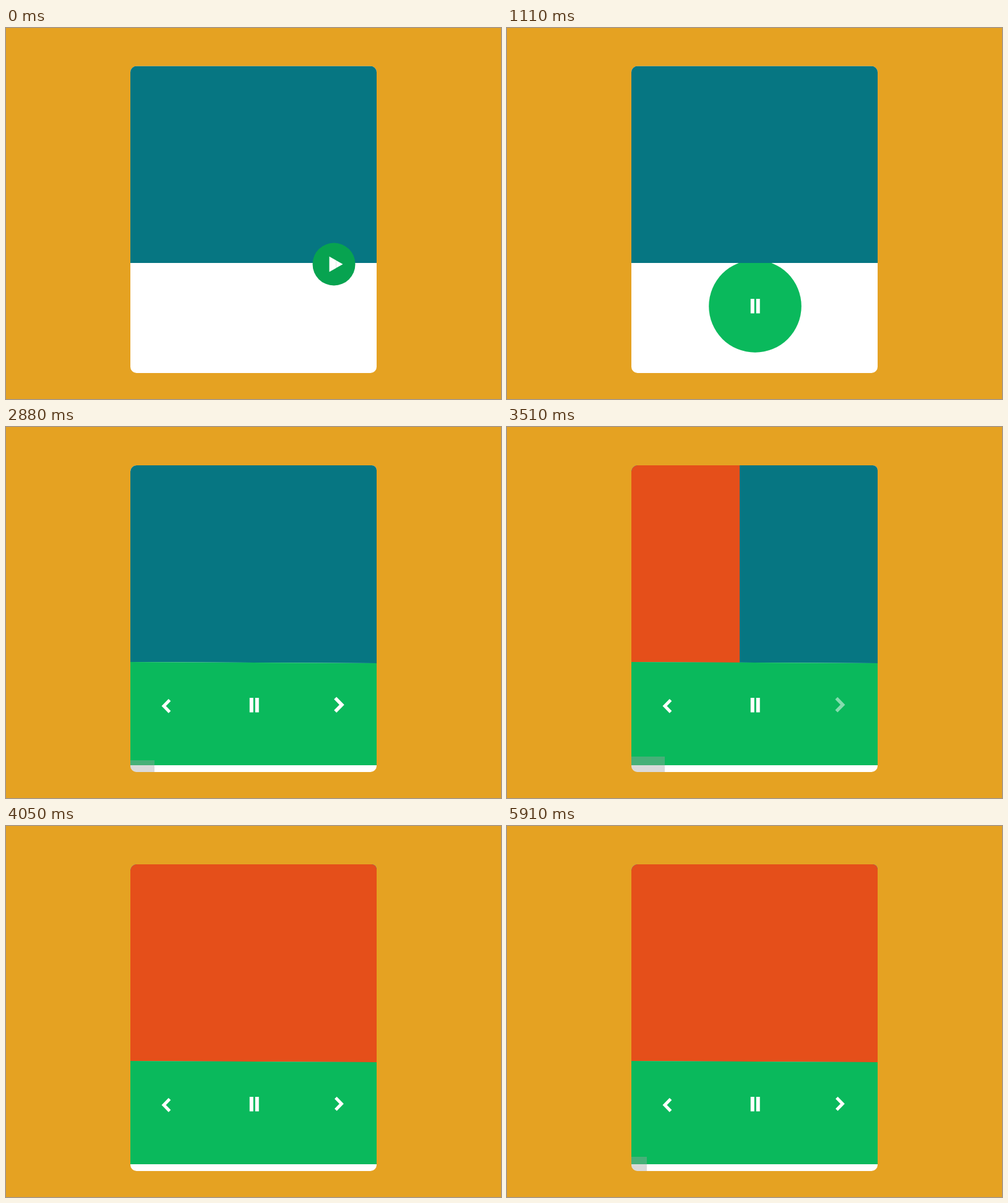
Write an HTML page with a canvas that moves like this. It is 800 px wide and 600 px high and loops after 5.97 s.

```html
<!DOCTYPE html>
<html lang="en">
<head>
<meta charset="utf-8">
<title>Player card</title>
<style>
  html, body { margin: 0; width: 100%; height: 100%; overflow: hidden; background: #e5a222; }
  canvas { display: block; width: 800px; height: 600px; }
</style>
</head>
<body>
<canvas id="stage" width="800" height="600"></canvas>
<script>
const ctx = document.getElementById('stage').getContext('2d');
const LOOP = 5970;
const STEP = 30;
const LEFT = 201, RIGHT = 599, BOTTOM = 558;
const AMBER = '#e5a222', TEAL = '#067682', ORANGE = '#e54f1a', GREEN = '#0ab95c';

const mix = (a, b, k) => a + (b - a) * k;
const span = (t, a, b) => Math.min(1, Math.max(0, (t - a) / (b - a)));
const smooth = k => (1 - Math.cos(Math.PI * k)) / 2;

// Linear interpolation over [time, value] pairs.
function track(t, keys) {
  let i = 1;
  while (i < keys.length - 1 && t > keys[i][0]) i++;
  const [a, u] = keys[i - 1], [b, v] = keys[i];
  return mix(u, v, span(t, a, b));
}

function bezier(s, a, b, c, d) {
  const r = 1 - s;
  return r * r * r * a + 3 * r * r * s * b + 3 * r * s * s * c + s * s * s * d;
}

function poly(points, fill) {
  ctx.beginPath();
  points.forEach(([x, y]) => ctx.lineTo(x, y));
  ctx.closePath();
  ctx.fillStyle = fill;
  ctx.fill();
}

function rect(x, y, w, h, fill) {
  ctx.fillStyle = fill;
  ctx.fillRect(x, y, w, h);
}

function disc(x, y, r, fill) {
  ctx.beginPath();
  ctx.arc(x, y, r, 0, 2 * Math.PI);
  ctx.fillStyle = fill;
  ctx.fill();
}

// Two halves of the play triangle, each turning into a pause bar.
const HALVES = [
  { play: [[-7.5, -12.5], [3.5, -6.25], [3.5, 6.25], [-7.5, 12.5]], bar: [-7.3, -1.3] },
  { play: [[3.3, -6.36], [14.5, 0], [14.5, 0], [3.3, 6.36]], bar: [1.7, 7.7] }
];

function playPause(x, y, k) {
  for (const { play, bar: [l, r] } of HALVES) {
    const pause = [[l, -12], [r, -12], [r, 11.5], [l, 11.5]];
    poly(play.map(([px, py], i) => [
      x + mix(px, pause[i][0], k),
      y + mix(py, pause[i][1], k)
    ]), '#fff');
  }
}

function chevron(x, y, dir, scale, alpha) {
  ctx.save();
  ctx.globalAlpha = alpha;
  ctx.translate(x, y);
  ctx.scale(dir * scale, scale);
  ctx.beginPath();
  ctx.moveTo(-5.5, -9.7);
  ctx.lineTo(4, 0);
  ctx.lineTo(-5.5, 9.7);
  ctx.lineWidth = 5;
  ctx.strokeStyle = '#fff';
  ctx.stroke();
  ctx.restore();
}

function progress(t) {
  let width = 0, top = 542;
  if (t > 1500 && t < 3750) {
    width = track(t, [[1500, 0], [2400, 26], [2880, 39], [3510, 54], [3750, 60]]);
    top = track(t, [[2400, 542], [2880, 539], [3510, 533], [3750, 531]]);
  } else if (t > 4260) {
    width = track(t, [[4260, 0], [5910, 25]]);
    top = 535;
  }
  if (width > 0) rect(LEFT, top, width, BOTTOM - top, 'rgba(162,162,162,.4)');
}

function panel(t, x, y, tilt) {
  const open = span(t, 1020, 1320);
  ctx.save();
  if (open > 0) {
    ctx.beginPath();
    ctx.moveTo(LEFT, 380);
    ctx.lineTo(RIGHT, 380 + tilt);
    ctx.lineTo(RIGHT, 547);
    ctx.lineTo(LEFT, 547);
    ctx.clip();
  }
  const glow = span(t, 0, 600);
  const fill = `rgb(${mix(7, 10, glow)},${mix(163, 185, glow)},${mix(80, 92, glow)})`;
  disc(x, y, mix(34.5, 230, smooth(open)), open > 0 ? GREEN : fill);
  ctx.restore();
}

function draw(t) {
  const tilt = t >= 1680 ? 2 : 0;
  const top = tilt ? 62 : 61.5;

  rect(0, 0, 800, 600, AMBER);
  ctx.save();
  ctx.beginPath();
  ctx.roundRect(LEFT, top, RIGHT - LEFT, BOTTOM - top, [10, tilt ? 8 : 10, 10, 10]);
  ctx.clip();
  rect(LEFT, top, 398, BOTTOM - top, '#fff');
  poly([[LEFT, top], [RIGHT, top], [RIGHT, 380 + tilt], [LEFT, 380]], TEAL);

  const wipe = 398 * smooth(span(t, 3240, 3825));
  if (wipe > 0) {
    const edge = LEFT + wipe;
    poly([[LEFT, top], [edge, top], [edge, 380 + tilt * wipe / 398], [LEFT, 380]], ORANGE);
  }

  const s = track(t, [[600, 0], [720, .28], [900, .76], [1020, 1]]);
  const x = bezier(s, 530, 525, 490, 401);
  const y = bezier(s, 382, 448, 450, 450);
  panel(t, x, y, tilt);
  progress(t);
  ctx.restore();

  playPause(x, y, smooth(span(t, 600, 810)));

  const shown = span(t, 1230, 1470);
  const size = track(t, [[2640, 1], [2880, 1.12], [3300, 1.12], [3510, 1.08], [3840, 1]]);
  const alpha = track(t, [[3030, 1], [3360, .5], [3600, .5], [3900, 1]]);
  if (shown > 0) {
    chevron(259, 451.2, -1, 1, shown);
    chevron(538.3, 449.2, 1, size, shown * alpha);
  }
}

const start = performance.now();
function tick() {
  const t = Math.max(0, performance.now() - start) % LOOP;
  draw(Math.floor(t / STEP) * STEP);
  requestAnimationFrame(tick);
}
tick();
</script>
</body>
</html>
```
